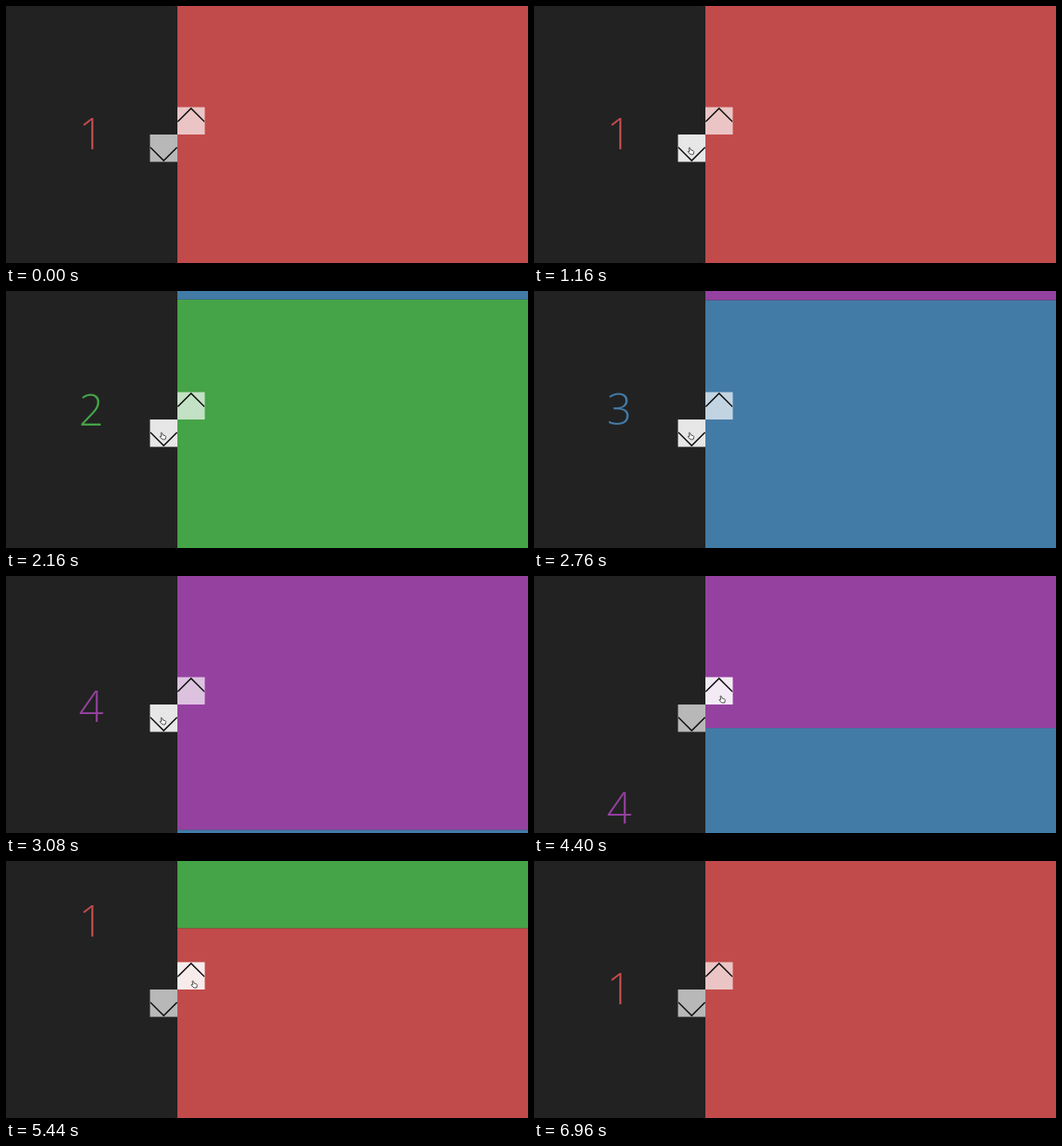
Recreate the animation shown at these times as an HTML page with a canvas. Size 600 px wide and 296 px high, loop 7.88 s.

```html
<!DOCTYPE html>
<html lang="en">
<head>
<meta charset="utf-8">
<title>Split slider</title>
<style>
  html, body { margin: 0; width: 100%; height: 100%; overflow: hidden; background: #222; }
  canvas { display: block; }
</style>
</head>
<body>
<canvas id="stage" width="600" height="296"></canvas>
<script>
const ctx = document.getElementById('stage').getContext('2d');
const W = 600, H = 296, SPLIT = 197, LOOP = 7880, SLIDE = 400, FADE = 200;
const COLORS = ['#c14b4a', '#45a348', '#437ba7', '#9541a0'];

// Slide starts: [time, direction]
const SLIDES = [[1502, 1], [2141, 1], [2740, 1], [4301, -1], [4725, -1], [5264, -1]];

// Pointer legs: [from, to, x0, y0, x1, y1]
const LEGS = [
  [40, 840, 243, 101, 178, 163],
  [3760, 4200, 178, 163, 214, 138],
  [6320, 6960, 214, 138, 287, 45]
];

const UP_HOVER = [[300, 545], [3960, 6420]];
const DOWN_HOVER = [[560, 3950]];

const clamp = v => Math.min(1, Math.max(0, v));
const smooth = v => v * v * (3 - 2 * v);

// CSS "ease": cubic-bezier(.25, .1, .25, 1)
function ease(x) {
  if (x <= 0 || x >= 1) return clamp(x);
  const curve = (a, b, s) => 3 * a * s * (1 - s) ** 2 + 3 * b * s * s * (1 - s) + s ** 3;
  let lo = 0, hi = 1;
  for (let i = 0; i < 24; i++) {
    const mid = (lo + hi) / 2;
    if (curve(.25, .25, mid) < x) lo = mid; else hi = mid;
  }
  return curve(.1, 1, lo);
}

const pageAt = t => SLIDES.reduce((p, [start, dir]) => p + dir * ease((t - start) / SLIDE), 0);

const hoverAt = (t, spans) => spans.reduce(
  (h, [from, to]) => h + ease((t - from) / FADE) - ease((t - to) / FADE), 0);

function pointerAt(t) {
  if (t < LEGS[0][0] || t >= LEGS[2][1]) return null;
  const [from, to, x0, y0, x1, y1] = LEGS.filter(leg => t >= leg[0]).pop();
  const k = smooth(clamp((t - from) / (to - from)));
  return [x0 + (x1 - x0) * k, y0 + (y1 - y0) * k];
}

function drawButton(x, y, dir, hover) {
  const size = 31.5, tip = dir < 0 ? y + 1.5 : y + size - 1.5;
  ctx.save();
  ctx.beginPath();
  ctx.rect(x, y, size, size);
  ctx.fillStyle = `rgba(255,255,255,${.68 + .21 * hover})`;
  ctx.fill();
  ctx.clip();
  ctx.beginPath();
  ctx.moveTo(x + .4, tip - dir * 15.3);
  ctx.lineTo(x + size / 2, tip);
  ctx.lineTo(x + size - .4, tip - dir * 15.3);
  ctx.strokeStyle = '#111';
  ctx.lineWidth = 1.6;
  ctx.stroke();
  ctx.restore();
}

const HAND = new Path2D('M0 .5Q1-.4 1.6.8L2.4 3 5 3.6Q6 4 5.7 5.8L5 8H2L-1.2 5Q-1.4 4 .8 4.4Z');
const ARROW = new Path2D('M0 0V7L1.6 5.6 2.8 8.2 3.9 7.7 2.8 5.2H5Z');

function drawPointer(x, y) {
  const onUp = x >= 197 && x < 228.5 && y >= 116.5 && y < 148;
  const onDown = x >= 165.5 && x < 197 && y >= 148 && y < 179.5;
  const hand = onUp || onDown;
  ctx.save();
  ctx.translate(x, y);
  ctx.lineWidth = .8;
  ctx.fillStyle = hand ? '#fff' : '#111';
  ctx.strokeStyle = hand ? '#222' : '#eee';
  ctx.fill(hand ? HAND : ARROW);
  ctx.stroke(hand ? HAND : ARROW);
  ctx.restore();
}

function draw(t) {
  const page = pageAt(t);
  ctx.fillStyle = '#222';
  ctx.fillRect(0, 0, W, H);
  ctx.font = "300 50px 'Open Sans', sans-serif";
  ctx.textAlign = 'center';
  COLORS.forEach((color, i) => {
    const offset = (i - page) * H;
    if (Math.abs(offset) >= H) return;
    ctx.fillStyle = color;
    ctx.fillText(i + 1, SPLIT / 2 - .5, 164.5 + offset);
    ctx.fillRect(SPLIT, -offset, W - SPLIT, H);
  });
  drawButton(SPLIT, 116.5, -1, hoverAt(t, UP_HOVER));
  drawButton(SPLIT - 31.5, 148, 1, hoverAt(t, DOWN_HOVER));
  const pointer = pointerAt(t);
  if (pointer) drawPointer(...pointer);
}

function tick() {
  draw(performance.now() % LOOP);
  requestAnimationFrame(tick);
}
tick();
</script>
</body>
</html>
```
